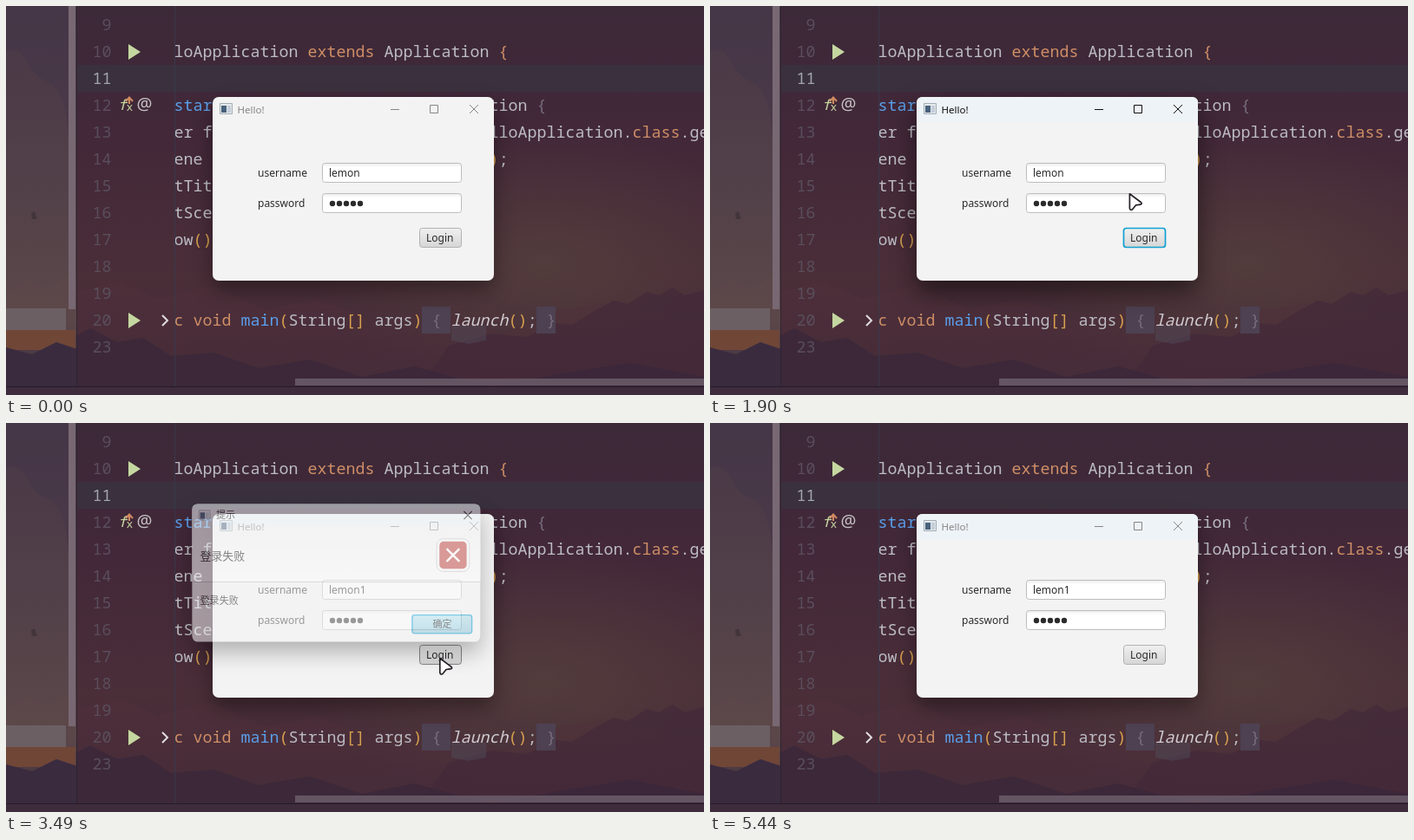
An HTML page for the animation above (5.5 s loop, 804 by 449 pixels).

```html
<!DOCTYPE html>
<html lang="zh">
<head>
<meta charset="utf-8">
<title>Login demo</title>
<style>
  html, body { margin: 0; width: 100%; height: 100%; overflow: hidden; background: #3d2a3a; }
  svg { display: block; width: 100vw; height: 100vh; }
  .code { font: 18.33px "Noto Sans Mono", "DejaVu Sans Mono", monospace; }
  .ui { font: 12px "Noto Sans", "Open Sans", "Noto Sans CJK SC", "Noto Sans CJK", sans-serif; fill: #2b2b2b; }
  .cjk { font-family: "Noto Sans CJK SC", "Noto Sans CJK", sans-serif; }
  .line { fill: none; stroke: currentColor; }
  #win { color: #868686; filter: drop-shadow(0 10px 11px rgba(0,0,0,.36)); }
  #win.active { color: #111; filter: drop-shadow(0 13px 14px rgba(0,0,0,.5)); }
  #card { filter: drop-shadow(0 13px 14px rgba(0,0,0,.5)); }
</style>
</head>
<body>
<svg viewBox="0 0 804 449">
  <defs>
    <linearGradient id="sky" x2="0" y2="1">
      <stop offset="0" stop-color="#3c2938"/><stop offset=".35" stop-color="#432839"/>
      <stop offset=".7" stop-color="#4a2e38"/><stop offset="1" stop-color="#3e2a39"/>
    </linearGradient>
    <radialGradient id="glow">
      <stop offset="0" stop-color="#5c4a40" stop-opacity=".5"/><stop offset="1" stop-color="#5c4a40" stop-opacity="0"/>
    </radialGradient>
    <linearGradient id="side" x2="0" y2="1">
      <stop offset="0" stop-color="#483846"/><stop offset=".4" stop-color="#513f49"/>
      <stop offset=".77" stop-color="#5a4749"/><stop offset="1" stop-color="#41303f"/>
    </linearGradient>
    <linearGradient id="btn" x2="0" y2="1"><stop stop-color="#f0f0f0"/><stop offset="1" stop-color="#d6d6d6"/></linearGradient>
    <linearGradient id="okFill" x2="0" y2="1"><stop stop-color="#b4deeb"/><stop offset="1" stop-color="#94c7da"/></linearGradient>
    <linearGradient id="field" x2="0" y2="1"><stop stop-color="#ececec"/><stop offset=".22" stop-color="#fff"/></linearGradient>
    <linearGradient id="head" x2="0" y2="1"><stop stop-color="#f3f3f3"/><stop offset="1" stop-color="#fcfcfc"/></linearGradient>
    <linearGradient id="blue" x2="0" y2="1"><stop stop-color="#3b67b8"/><stop offset="1" stop-color="#4580d2"/></linearGradient>
    <clipPath id="codeArea"><path d="M195 0H804V430H195Z"/></clipPath>
    <g id="appIcon">
      <path d="M.5 .5H14.5V12.5H.5Z" fill="#e4e8ec" stroke="#a4adb4"/>
      <path d="M2 3H8V11H2Z" fill="#48627c"/><path d="M9 3H13V11H9Z" fill="#c3ced8"/>
    </g>
  </defs>

  <!-- Editor backdrop -->
  <path d="M0 0H804V449H0Z" fill="url(#sky)"/>
  <ellipse cx="620" cy="295" rx="270" ry="150" fill="url(#glow)"/>
  <path d="M82 330L130 318 175 338 235 322 300 350 360 338 420 362 500 350 570 378 640 350 700 342 804 368V449H82Z" fill="#50303b" opacity=".4"/>
  <path d="M510 392L560 378 600 382 632 366 652 368 678 352 700 340 716 344 738 330 752 334 768 325 782 334 804 328V449H470Z" fill="#43293a" opacity=".65"/>
  <path d="M82 380L97 372 128 388 158 383 190 404 240 400 290 418 350 408 410 428 470 416 560 440 640 424 720 412 804 428V449H82Z" fill="#38273a" opacity=".7"/>
  <path d="M513 369H553V386L533 390 513 386Z" fill="#505060" opacity=".4"/>

  <path d="M0 0H82V449H0Z" fill="url(#side)"/>
  <path d="M0 52Q16 46 24 64T52 90Q70 104 72 150V0H0Z" fill="#44364a" opacity=".55"/>
  <path d="M0 330L24 316 48 326 82 306V380H0Z" fill="#5e494a" opacity=".6"/>
  <path d="M29 239L33 237 36 246H30Z" fill="#43353c"/>
  <path d="M0 349H69V374H0Z" fill="#6b5f63"/>
  <path d="M0 374H80V397H0Z" fill="#704637"/>
  <path d="M0 394L30 402 58 388 82 396V449H0Z" fill="#3a2b3f"/>
  <path d="M72 0H80V350H72Z" fill="#786873"/>
  <path d="M81.5 0V439" stroke="#2f2430"/>
  <path d="M82 68H804V99H82Z" fill="#383641" opacity=".65"/>
  <path d="M194.5 0V439" stroke="#38384a"/>
  <path d="M479 347H512V378H479ZM611 347H633V378H611Z" fill="#4d4152"/>
  <path d="M333 430H804V438H333Z" fill="#6d5d6c" opacity=".85"/>
  <path d="M0 440H804V449H0Z" fill="#3e2c3d"/><path d="M0 439.5H804" stroke="#251b29"/>
  <path d="M141 44L155 53 141 62ZM141 354L155 363 141 372Z" fill="#c5d7a0"/>
  <path d="M180 357L186 363 180 369" fill="none" stroke="#e0dde0" stroke-width="2"/>
  <g class="code" id="gutter">
    <text x="129" y="120" font-style="italic" font-size="17" fill="#c5d7a0">f</text>
    <text x="138.500" y="121" font-size="13" fill="#c5d7a0">x</text>
    <path d="M142 113V106M138 110L142 105.500 146 110" fill="none" stroke="#d08a62" stroke-width="2"/>
    <text x="150.500" y="120" font-size="20" fill="#c5c2c5" font-family="Noto Sans, sans-serif">@</text>
  </g>
  <g class="code" id="code" clip-path="url(#codeArea)"></g>

  <!-- Login window -->
  <g id="win" class="ui">
    <rect x="238" y="105" width="324" height="212" rx="7" fill="#f3f3f3"/>
    <path id="bar" d="M238 134V112Q238 105 245 105H555Q562 105 562 112V134Z" fill="#eef3f8"/>
    <use href="#appIcon" x="246" y="112"/>
    <text x="266.500" y="123.500" font-size="11.500" style="fill:currentColor">Hello!</text>
    <path class="line" d="M443 119.500H453M488.500 114.500H497.500V123.500H488.500ZM534 114L544 124M544 114L534 124"/>
    <text x="290" y="197">username</text><text x="290" y="232">password</text>
    <rect id="user" x="364.500" y="181.500" width="160" height="22" rx="3" fill="url(#field)"/>
    <rect x="364.500" y="216.500" width="160" height="22" rx="3" fill="url(#field)" stroke="#bdbdbd"/>
    <text id="name" x="372" y="197"></text>
    <path id="caret" d="M408.500 186V200" stroke="#222"/>
    <path d="M376 228H409" stroke="#2b2b2b" stroke-width="6.400" stroke-linecap="round" stroke-dasharray="0 8"/>
    <rect id="login" x="476.500" y="256.500" width="48" height="22" rx="3" fill="url(#btn)"/>
    <text x="484" y="272">Login</text>
  </g>

  <!-- Result dialog -->
  <g id="dialog"><g id="card" class="ui cjk">
    <rect x="205" y="89" width="360" height="172.500" rx="7" fill="#f4f4f4"/>
    <path d="M205 117V96Q205 89 212 89H558Q565 89 565 96V117Z" fill="#eef3f7"/>
    <path d="M205 117H565V186H205Z" fill="url(#head)"/>
    <path d="M205 186.500H565" stroke="#c2c2c2"/>
    <use href="#appIcon" x="213" y="96.500"/>
    <text x="235" y="107">提示</text>
    <path d="M544.500 98L554.500 108M554.500 98L544.500 108" stroke="#222" stroke-width="1.200"/>
    <text class="msg" x="215" y="159" font-size="14"></text>
    <text class="msg" x="215" y="214.500"></text>
    <g id="info">
      <circle cx="530.700" cy="153" r="20.500" fill="#fafafa" stroke="#c9c9c9"/>
      <circle cx="530.700" cy="153" r="17.300" fill="url(#blue)"/>
      <circle cx="530.700" cy="145" r="2" fill="#fff"/><path d="M530.700 149.500V161" stroke="#fff" stroke-width="3"/>
    </g>
    <g id="error">
      <rect x="510.500" y="132.500" width="41" height="41" rx="8" fill="#fafafa" stroke="#c9c9c9"/>
      <rect x="514" y="136" width="34" height="34" rx="5" fill="#c2504d"/>
      <path d="M523 145L539 161M539 145L523 161" stroke="#fff" stroke-width="2.600"/>
    </g>
    <rect x="480" y="228" width="74.500" height="23" rx="3" fill="url(#okFill)" stroke="#16a0d2" stroke-width="1.500"/>
    <text x="505.500" y="244">确定</text>
  </g></g>

  <!-- Pointer -->
  <g id="pointer">
    <circle id="click" r="12" fill="#ffef3c" opacity=".75"/>
    <path id="arrow" d="M.8 1.500L14 11.500Q15.500 13.500 13 13.800L8 14.500 4 19.500Q1.300 21 .8 18Z" fill="#fff" stroke="#272227" stroke-width="1.700" stroke-linejoin="round"/>
    <path id="beam" d="M-4 -8H-1L0 -7 1 -8H4M-4 8H-1L0 7 1 8H4M0 -7V7" fill="none" stroke="#222" stroke-width="1.300"/>
  </g>
</svg>
<script>
const $ = id => document.getElementById(id);
const rowY = row => 28 + 31 * row;
const PLAIN = '#bcbcc3', KEY = '#cf8e66', FN = '#5a9fec', GOLD = '#d8a04f', DIM = '#776e7a';

function addText(parent, x, y, text, fill, extra = '') {
  parent.insertAdjacentHTML('beforeend', `<text x="${x}" y="${y}" fill="${fill}" ${extra}>${text}</text>`);
}

[9, 10, 11, 12, 13, 14, 15, 16, 17, 18, 19, 20, 23].forEach((n, row) =>
  addText($('gutter'), 121.5, rowY(row), n, n === 11 ? '#a3a5b0' : '#5a4e5c', 'text-anchor="end"'));

// row, column, text, colour
[[1, 0, 'loApplication', PLAIN], [1, 14, 'extends', KEY], [1, 22, 'Application', PLAIN], [1, 34, '{', KEY],
 [3, 0, 'start', FN], [3, 33, 'tion', PLAIN], [3, 38, '{', DIM],
 [4, 0, 'er', PLAIN], [4, 3, 'f', PLAIN], [4, 33, 'lloApplication.', PLAIN], [4, 48, 'class', KEY], [4, 53, '.get', PLAIN],
 [5, 0, 'ene', PLAIN], [5, 33, ')', GOLD], [5, 34, ';', PLAIN],
 [6, 0, 'tTit', PLAIN], [7, 0, 'tSce', PLAIN], [8, 0, 'ow', PLAIN], [8, 2, '()', GOLD],
 [11, 0, 'c', KEY], [11, 2, 'void', KEY], [11, 7, 'main', FN], [11, 11, '(', GOLD], [11, 12, 'String', PLAIN],
 [11, 18, '[]', GOLD], [11, 21, 'args', PLAIN], [11, 25, ')', GOLD], [11, 27, '{', DIM],
 [11, 29, 'launch', '#d0cbd0', 'font-style="italic"'], [11, 35, '()', GOLD], [11, 37, ';', PLAIN], [11, 39, '}', DIM]
].forEach(([row, col, text, fill, extra]) => addText($('code'), 193.5 + col * 11, rowY(row), text, fill, extra));

const LOOP = 5500, STEP = 68;
const starts = [0, 130, 800, 1420, 2030, 2650, 3280, 3840, 4460, 4670, 5370];
const clicks = [800, 1420, 2370, 3280, 4460];
const opening = [[.9, .15], [.922, .55], [.975, .85]];
const closing = [[.99, .85], [.977, .55], [.95, .2]];
// time, x, y of the pointer tip
const path = [
  [130, 684, 437], [334, 575, 330], [538, 486, 262], [670, 499, 270], [1160, 499, 270], [1344, 510, 235],
  [1692, 510, 235], [1960, 478, 212], [2302, 431, 189], [2442, 431, 189], [2580, 442, 210], [2854, 442, 210],
  [3150, 499, 270], [3700, 499, 270], [3840, 506, 278], [4044, 328, 178], [4112, 360, 183], [4384, 497, 231],
  [4738, 497, 231], [5160, 717, 422]];

function hold(t) {
  const s = starts.filter(v => v <= t).pop();
  return s + Math.floor((t - s + 1) / STEP) * STEP;
}

function pointerAt(t) {
  const i = path.findIndex(p => p[0] > t);
  if (i < 1) return path[i < 0 ? path.length - 1 : 0].slice(1);
  const [t0, x0, y0] = path[i - 1], [t1, x1, y1] = path[i];
  let k = (t - t0) / (t1 - t0);
  k = k * k * (3 - 2 * k);
  return [x0 + (x1 - x0) * k, y0 + (y1 - y0) * k];
}

function dialogAt(t, openClick, closeClick) {
  const i = Math.floor((t - openClick) / STEP) - 2, j = Math.floor((t - closeClick + 2) / STEP) - 3;
  if (i < 0) return [1, 0];
  if (j >= 0) return closing[j] || [1, 0];
  return opening[i] || [1, 1];
}

const show = (id, on) => $(id).style.display = on ? '' : 'none';
const within = (t, a, b) => t >= a && t < b;

function ring(id, focused, plain) {
  $(id).setAttribute('stroke', focused ? '#12a0d3' : plain);
  $(id).setAttribute('stroke-width', focused ? 1.7 : 1);
}

function draw(now) {
  const t = hold(now % LOOP), failed = t >= 3280;
  const [scale, alpha] = failed ? dialogAt(t, 3280, 4460) : dialogAt(t, 800, 1420);
  show('dialog', alpha > 0);
  $('dialog').setAttribute('opacity', alpha);
  $('dialog').setAttribute('transform', `translate(325 147) scale(${scale}) translate(-325 -147)`);
  document.querySelectorAll('.msg').forEach(m => m.textContent = failed ? '登录失败' : '登录成功');
  show('info', !failed);
  show('error', failed);

  const active = within(t, 800, 936) || within(t, 1760, 3416) || within(t, 4800, 5370);
  $('win').classList.toggle('active', active);
  show('bar', active || t >= 4660);
  $('name').textContent = t < 2718 ? 'lemon' : 'lemon1';
  const typing = within(t, 2370, 3280);
  ring('user', typing, '#bdbdbd');
  ring('login', within(t, 800, 936) || within(t, 1624, 2370) || within(t, 3280, 3416) || within(t, 4660, 5370),
    within(t, 3400, 3600) ? '#858585' : '#b2b2b2');
  show('caret', within(t, 2438, 2718));

  const [x, y] = pointerAt(t);
  const overField = x > 364 && x < 525 && (within(y, 181, 204) || within(y, 216, 239)) && alpha < .7;
  show('pointer', within(t, 130, 5150));
  $('pointer').setAttribute('transform', `translate(${x.toFixed(1)} ${y.toFixed(1)})`);
  show('arrow', !overField);
  show('beam', overField);
  show('click', clicks.some(c => within(t, c, c + 60)));
}

const begin = performance.now();
function tick() {
  draw(performance.now() - begin);
  requestAnimationFrame(tick);
}
tick();
</script>
</body>
</html>
```
